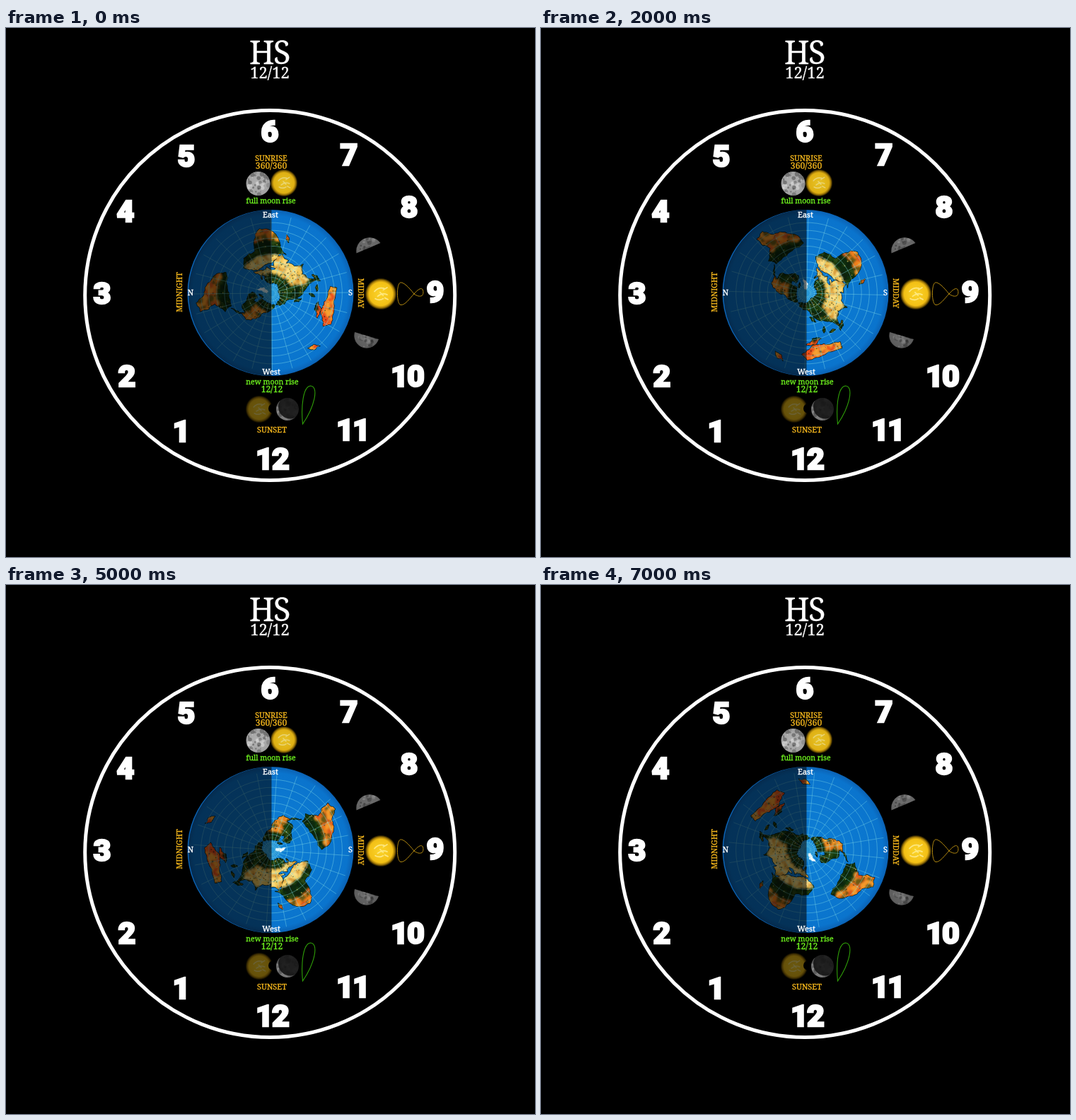
Recreate the animation shown at these times as an HTML page. Size 748 by 748 pixels, loop 8 s.

```html
<!DOCTYPE html>
<html lang="en">
<head>
<meta charset="utf-8">
<title>Sky clock</title>
<style>
html, body { margin: 0; width: 100%; height: 100%; overflow: hidden; background: #000; }
svg { display: block; width: 100vw; height: 100vh; }
text { font-family: "Noto Serif", serif; text-anchor: middle; }
.num { font: 900 43px Roboto, sans-serif; fill: #fff; stroke: #fff; stroke-width: 2.5; letter-spacing: -2px; }
</style>
</head>
<body>
<svg id="stage" viewBox="0 0 748 748" xmlns="http://www.w3.org/2000/svg">
  <defs>
    <radialGradient id="sea">
      <stop offset="0" stop-color="#2f9fd8"/><stop offset=".18" stop-color="#0d7dd4"/>
      <stop offset=".93" stop-color="#0a74cd"/><stop offset="1" stop-color="#0b62b4"/>
    </radialGradient>
    <radialGradient id="sun">
      <stop offset="0" stop-color="#fbd42c"/><stop offset=".74" stop-color="#f3c015"/>
      <stop offset=".86" stop-color="#e0a80c" stop-opacity=".75"/><stop offset="1" stop-color="#d09a00" stop-opacity="0"/>
    </radialGradient>
    <radialGradient id="moon">
      <stop offset="0" stop-color="#b4b4b4"/><stop offset=".8" stop-color="#a2a2a2"/><stop offset="1" stop-color="#777"/>
    </radialGradient>
    <filter id="soft" x="-20%" y="-20%" width="140%" height="140%"><feGaussianBlur stdDeviation="1.2"/></filter>
    <filter id="haze"><feGaussianBlur stdDeviation=".7"/></filter>
    <clipPath id="landClip"><path id="landShape"/></clipPath>
    <clipPath id="fullClip"><circle cx="356.5" cy="220" r="17"/></clipPath>
    <clipPath id="upClip"><path d="M495.500 318.500A19 19 0 0 1 529.500 304Z"/></clipPath>
    <clipPath id="downClip"><path d="M493 430A17.700 17.700 0 0 0 527 440Z"/></clipPath>
    <clipPath id="newClip"><circle cx="398" cy="539" r="16"/></clipPath>
  </defs>
  <rect width="748" height="748"/>
  <circle cx="373.200" cy="378" r="261.500" fill="none" stroke="#fff" stroke-width="5"/>
  <g id="sky"></g>
  <circle cx="374" cy="374.500" r="117.500" fill="url(#sea)"/>
  <g id="map">
    <path id="shore" fill="#0d280d" stroke="#04160c" stroke-width="1.200" stroke-linejoin="round"/>
    <g clip-path="url(#landClip)"><g id="zones" filter="url(#soft)"></g><g id="specks"></g></g>
    <path id="ice" fill="#f4fbff"/>
    <path id="grid" fill="none" stroke="#7fdbe6" stroke-opacity=".52" stroke-width=".75"/>
  </g>
  <path d="M375.500 257A117.500 117.500 0 1 0 375.500 492Z" fill="#000" opacity=".57"/>
  <g id="labels"></g>
  <path d="M577 376C569 366 562 359 557.500 360C552 362 552 390 558 391.500C564 392.500 571 382 577 376C582 370 586 367.500 588.500 369C590.500 371 590.500 377 588 378.500C585 380 581 379 577 376Z" fill="none" stroke="#b48a10"/>
  <path d="M419.500 560C417 535 420 507 430.500 506C443 507 436 536 419.500 560Z" fill="none" stroke="#2f9f08" stroke-width="1.100"/>
</svg>
<script>
const $ = id => document.getElementById(id);
const GOLD = '#f2b51c', GREEN = '#6df01e', WHITE = '#fff';
const SCALE = 0.74, POLE = [375.5, 375], STEP = 30.9, TURN = -120.5;

let seed = 7;
const rnd = () => (seed = seed * 16807 % 2147483647) / 2147483647;
const pick = list => list[Math.floor(rnd() * list.length)];

function add(parent, tag, attrs, text) {
  const el = document.createElementNS('http://www.w3.org/2000/svg', tag);
  for (const k in attrs) el.setAttribute(k, attrs[k]);
  if (text) el.textContent = text;
  parent.appendChild(el);
  return el;
}

// Polar map: distance from the centre follows latitude
function polar(lon, lat) {
  const a = lon * Math.PI / 180, r = (90 - lat) * SCALE;
  return [r * Math.cos(a), r * Math.sin(a)];
}

// Breaks an edge into a ragged shore by midpoint displacement
function ragged([ax, ay], [bx, by], depth) {
  if (!depth) return `L${bx.toFixed(1)},${by.toFixed(1)}`;
  const k = (rnd() - 0.5) * 0.3;
  const mid = [(ax + bx) / 2 + (by - ay) * k, (ay + by) / 2 - (bx - ax) * k];
  return ragged([ax, ay], mid, depth - 1) + ragged(mid, [bx, by], depth - 1);
}

function coast(pts) {
  return `M${pts[0]}` + pts.map((p, i) => ragged(p, pts[(i + 1) % pts.length], 3)).join('') + 'Z';
}

// Key points as "lon,lat lon,lat ..."
const points = text => text.split(' ').map(p => polar(...p.split(',').map(Number)));

const LANDS = {
  africa: '-8,34 10,37 32,31 43,12 51,11 40,-6 35,-22 20,-35 12,-15 9,4 -8,5 -17,18',
  eurasia: '-9,37 -3,46 8,54 5,61 25,71 60,69 104,77 140,72 188,66 160,58 140,55 130,40 121,30 108,18 ' +
    '103,2 97,16 88,21 78,8 70,23 56,27 58,20 45,13 35,29 36,37 27,38 40,42 30,46 20,39 10,44',
  northAmerica: '-166,66 -130,70 -88,69 -93,58 -80,53 -76,62 -56,53 -68,44 -81,30 -96,28 -90,16 -80,8 ' +
    '-105,20 -118,34 -125,49 -150,60',
  southAmerica: '-77,9 -60,9 -35,-6 -41,-22 -57,-37 -67,-55 -74,-50 -70,-20 -81,-5',
  australia: '114,-23 130,-12 143,-12 153,-27 148,-38 132,-32 116,-35'
};
const GREENLAND = '-45,60 -20,72 -30,83 -62,81';
// Islands run from one end to the other
const ISLES = ['49,-12 45,-25', '177,-36 168,-47', '141,44 131,32', '96,5 106,-6', '110,1 118,4',
  '131,-1 149,-9', '121,18 125,7', '-4,58 0,51', '-64,66 -86,72'];

function isle(text) {
  const [a, b] = points(text);
  const dx = (b[0] - a[0]) * 0.2, dy = (b[1] - a[1]) * 0.2;
  const x = (a[0] + b[0]) / 2, y = (a[1] + b[1]) / 2;
  return coast([a, [x - dy, y + dx], b, [x + dy, y - dx]]);
}

const FOREST = ['#0c2a0b', '#0a200a', '#143c10', '#2b4a12'];
const SAND = ['#fbe08a', '#f8d870', '#f3c858', '#d99a34'];
const ORANGE = ['#f0801c', '#f59a2a', '#dc5a1a', '#6a5a18'];
const RED = ['#f0501a', '#f2601c', '#e8481a', '#f5a030'];

function climate(lon, lat) {
  if (lon > 110 && lat < -10) return RED;
  if (lat < -18) return ORANGE;
  if (lat < 14 || lat > 48) return FOREST;
  if (lon > -20 && lon < 105) return SAND;
  return lon < -95 ? ORANGE : FOREST;
}

function buildMap() {
  const land = Object.values(LANDS).map(t => coast(points(t))).join('') + ISLES.map(isle).join('');
  $('shore').setAttribute('d', land);
  $('landShape').setAttribute('d', land);
  $('ice').setAttribute('d', coast(points(GREENLAND)));
  for (let lat = 74; lat > -58; lat -= 5)
    for (let lon = -170; lon < 190; lon += 5) {
      const [cx, cy] = polar(lon + rnd() * 5, lat + rnd() * 5);
      add($('zones'), 'circle', { cx, cy, r: 3 + (90 - lat) / 60, fill: pick(climate(lon, lat)) });
    }
  const tints = ['#061206', '#061206', '#143c10', '#c8641c', '#ffd860'];
  for (let i = 0; i < 1100; i++) {
    const [cx, cy] = polar(rnd() * 360, 78 - rnd() * 132);
    add($('specks'), 'circle', { cx, cy, r: 0.4 + rnd() * 0.8, fill: pick(tints), opacity: 0.5 });
  }
  let d = '';
  for (let k = 1; k < 10; k++) {
    const r = k * 15 * SCALE;
    d += `M${r} 0A${r} ${r} 0 1 1 ${-r} 0A${r} ${r} 0 1 1 ${r} 0`;
  }
  for (let lon = 0; lon < 360; lon += 15)
    d += `M${polar(lon, 84)}L${polar(lon, -59)}`;
  $('grid').setAttribute('d', d);
}

function moon(clip, cx, cy, opacity) {
  const g = add($('sky'), 'g', { 'clip-path': `url(#${clip})`, opacity });
  add(g, 'circle', { cx, cy, r: 20, fill: 'url(#moon)' });
  const spots = add(g, 'g', { filter: 'url(#haze)' });
  for (let i = 0; i < 40; i++) {
    const a = rnd() * 6.28, r = 16 * Math.sqrt(rnd());
    add(spots, 'circle', {
      cx: cx + r * Math.cos(a), cy: cy + r * Math.sin(a), r: 0.8 + rnd() * 3,
      fill: pick(['#444', '#555', '#777', '#e6e6e6']), opacity: 0.5
    });
  }
  return g;
}

function sun(cx, cy, r, opacity) {
  const g = add($('sky'), 'g', { opacity, transform: `translate(${cx} ${cy}) scale(${r / 20})` });
  add(g, 'circle', { r: 20, fill: 'url(#sun)' });
  add(g, 'path', {
    d: 'M-8-3Q-3-9 4-7M-4 3Q2-2 8 1M3-5L8-8M-7 6Q-2 9 3 6M5 5L9 7M-1-2L3 2',
    fill: 'none', stroke: '#fff0a0', 'stroke-width': 1.5, 'stroke-linecap': 'round', opacity: 0.75
  });
}

function buildSky() {
  moon('fullClip', 356.5, 220, 1);
  sun(393, 219, 19.5, 0.92);
  moon('upClip', 512.5, 311, 0.62);
  sun(530, 376, 22.5, 1);
  moon('downClip', 510, 435, 0.58);
  sun(358, 539, 19.5, 0.42);
  add($('sky'), 'circle', { cx: 378, cy: 538, r: 7 });
  const g = moon('newClip', 398, 539, 0.75);
  add(g, 'circle', { cx: 402, cy: 535.5, r: 17, fill: '#1c1c1c', opacity: 0.9 });
}

function label(text, x, y, size, fill, turn = 0) {
  return add($('labels'), 'text', {
    transform: `translate(${x} ${y}) rotate(${turn})`,
    'font-size': size, fill, stroke: fill, 'stroke-width': 0.35
  }, text);
}

function buildLabels() {
  label('HS', 372.5, 51, 45, WHITE).style.letterSpacing = '-1.5px';
  label('12/12', 373, 70.5, 22, WHITE);
  label('SUNRISE', 375, 188, 10.8, GOLD);
  label('360/360', 375, 199, 12.2, GOLD);
  label('full moon rise', 374.5, 248, 10.5, GREEN);
  label('new moon rise', 376.5, 504, 10.5, GREEN);
  label('12/12', 376, 515, 12.2, GREEN);
  label('SUNSET', 376, 572, 11, GOLD);
  label('East', 374, 268, 11, WHITE);
  label('West', 375, 490, 11, WHITE);
  label('N', 261, 378, 11, WHITE);
  label('S', 487, 378, 11, WHITE);
  label('MIDNIGHT', 249, 373.5, 10.7, GOLD, -90);
  label('MIDDAY', 497.5, 375, 10.6, GOLD, 90);
  const hours = '248,586 171,508 136,391 169,275 255,197 373,162 485,195 570,269 607,389 568,508 491,584 377,625';
  hours.split(' ').forEach((p, i) => {
    const [x, y] = p.split(',');
    add($('labels'), 'text', { class: 'num', x: x - 1, y: y - 1 }, String(i + 1));
  });
}

let shown = -1;
function draw(now) {
  const step = Math.floor(now % 8000 / 1000);
  if (step !== shown) {
    shown = step;
    $('map').setAttribute('transform', `translate(${POLE}) rotate(${TURN + step * STEP})`);
  }
  requestAnimationFrame(draw);
}

buildMap();
buildSky();
buildLabels();
draw(0);
</script>
</body>
</html>
```
